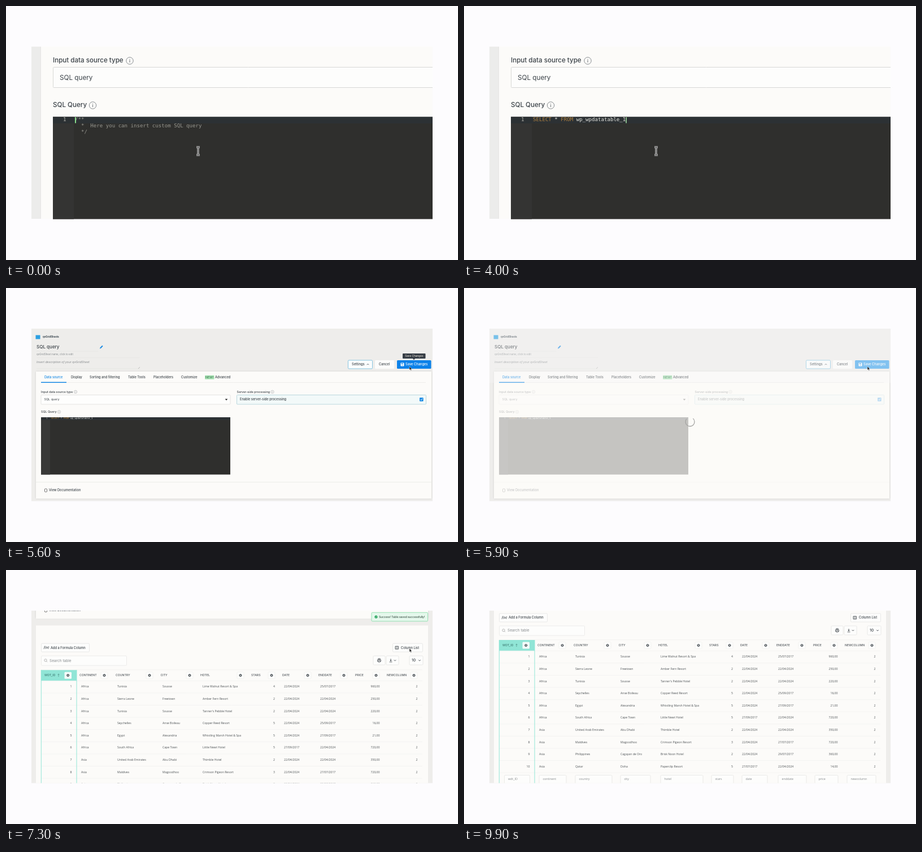
Write an HTML page with a canvas that moves like this. It is 800 by 450 pixels and loops after 10 s.

```html
<!DOCTYPE html>
<html lang="en">
<head>
<meta charset="utf-8">
<style>
html, body { margin: 0; width: 100%; height: 100%; overflow: hidden; background: #fdfcfe; }
canvas { display: block; width: 800px; height: 450px; }
</style>
</head>
<body>
<canvas id="stage" width="800" height="450"></canvas>
<script>
const stage = document.getElementById('stage');
const layer = document.createElement('canvas');
layer.width = 800;
layer.height = 450;
const main = stage.getContext('2d'), side = layer.getContext('2d');
let c = main;

const UI = 'Inter, sans-serif', CELL = '"Open Sans", sans-serif', MONO = '"DejaVu Sans Mono", monospace';
const INK = '#3b4248', MUTED = '#85898c', GREY = '#eeedeb', PAPER = '#fcfbf9', EDGE = '#dededc',
  BLUE = '#1488e4', DARK = '#2f2f2d', TEAL = '#90e5d6';
const QUERY = 'SELECT * FROM wp_wpdatatable_1';
const SCROLL = 340;

// ---------- drawing helpers ----------
function rect(x, y, w, h, fill, stroke, r = 0) {
  c.beginPath();
  c.roundRect(x, y, w, h, r);
  if (fill) { c.fillStyle = fill; c.fill(); }
  if (stroke) { c.strokeStyle = stroke; c.lineWidth = 0.8; c.stroke(); }
}
function text(s, x, y, size, color = INK, weight = 400, font = UI, align = 'left') {
  c.font = `${weight} ${size}px ${font}`;
  c.textAlign = align;
  c.textBaseline = 'middle';
  c.fillStyle = color;
  c.fillText(s, x, y);
}
function line(points, color, width = 0.8) {
  c.beginPath();
  points.forEach(([x, y]) => c.lineTo(x, y));
  c.strokeStyle = color;
  c.lineWidth = width;
  c.stroke();
}
function ring(x, y, r, color, width, from = 0, to = 7) {
  c.beginPath();
  c.arc(x, y, r, from, to);
  c.strokeStyle = color;
  c.lineWidth = width;
  c.stroke();
}
function shape(points, fill) {
  c.beginPath();
  points.forEach(([x, y]) => c.lineTo(x, y));
  c.fillStyle = fill;
  c.fill();
}
function info(x, y, r) {
  ring(x, y, r, '#777d82', r / 7);
  rect(x - r * .09, y - r * .15, r * .18, r * .65, '#777d82');
  rect(x - r * .09, y - r * .5, r * .18, r * .2, '#777d82');
}
function chevron(x, y, dir = 1) {
  line([[x - 1.8, y - dir], [x, y + dir], [x + 1.8, y - dir]], INK, 0.8);
}
function gear(x, y) {
  c.setLineDash([0.9, 0.85]);
  ring(x, y, 2.2, INK, 1);
  c.setLineDash([]);
  ring(x, y, 1.5, INK, 1.1);
}
function ibeam(x, y, s) {
  const mark = (color, w) => {
    line([[x, y - 7 * s], [x, y + 7 * s]], color, w);
    for (const d of [-7, 7]) line([[x - 3 * s, y + d * s], [x + 3 * s, y + d * s]], color, w);
  };
  mark('#e8e8e8', 3 * s);
  mark('#222', s);
}
function arrow(x, y) {
  const p = [[0, 0], [0, 7], [1.6, 5.6], [2.8, 8], [4, 7.4], [2.8, 5.2], [5, 5], [0, 0]].map(([a, b]) => [x + a * .9, y + b * .9]);
  shape(p, '#222');
  line(p, '#fff', 0.4);
}

// ---------- timing helpers ----------
const ease = p => p * p * (3 - 2 * p);
function track(t, keys, curve = p => p) {
  if (t <= keys[0][0]) return keys[0][1];
  for (let i = 1; i < keys.length; i++) {
    const [a, from] = keys[i - 1], [b, to] = keys[i];
    if (t <= b) return from + (to - from) * curve((t - a) / (b - a));
  }
  return keys[keys.length - 1][1];
}

function code(s, x, y, size) {
  const step = size * 0.602;
  let col = 0;
  for (const word of s.split(/(\s+)/)) {
    text(word, x + col * step, y, size, /^(SELECT|FROM)$/.test(word) ? '#b0803f' : '#e6e6e0', 400, MONO);
    col += word.length;
  }
  return x + col * step;
}

// ---------- close view of the editor ----------
function closeView(t) {
  rect(0, 0, 800, 450, '#fdfcfe');
  rect(45, 72, 710, 305, PAPER);
  rect(45, 72, 16.5, 305, '#ececeb');
  rect(60.8, 72, 0.8, 305, '#e0e0df');
  text('Input data source type', 83, 97, 11.6, INK, 500);
  info(219, 97, 6.2);
  rect(83.5, 108.5, 690, 36, '#fdfdfc', '#cfcfcd', 1);
  rect(755, 100, 45, 50, '#fdfcfe');
  text('SQL query', 95, 127, 11.7);
  text('SQL Query', 83, 176, 11.6, INK, 500);
  info(153.5, 176, 6.2);

  rect(83, 196.5, 672, 181, DARK);
  rect(83, 196.5, 37, 181, '#343433');
  rect(83, 196.5, 672, 11.5, '#2c3134');
  text('1', 101, 202, 9.1, '#b5b5ae', 400, MONO);
  if (t < 500) {
    ['/**', '  *  Here you can insert custom SQL query', '  */'].forEach((s, i) => {
      if (t >= 300) rect(122, 196.5 + 11 * i, s.length * 5.47, 11, '#50575a');
      text(s, 122, 202 + 11 * i, 9.1, '#96968f', 400, MONO);
    });
    rect(122, 197, 2, 10.5, '#8be08b');
  } else {
    const n = Math.round(track(t, [[500, 0], [1000, 8], [1200, 8], [1600, 15], [1700, 15], [2700, 30]]));
    const end = code(QUERY.slice(0, n), 122, 202, 9.1);
    rect(end, 197, 1.5, 10.5, '#a5e6a5');
  }
  ibeam(track(t, [[4200, 340], [4400, 349]]), track(t, [[4200, 257], [4400, 254]]), 1);
}

// ---------- settings part of the page ----------
function settings(saved, hover) {
  const dx = saved ? -6 : 0, half = saved ? 332 : 335;
  rect(52.5, 83.5, 8, 7, '#2b9fe2');
  text('qvGridSheets', 65, 87, 4.3, '#34404a', 700);
  text('SQL query', 54, 104.5, 8.05, INK, 500);
  c.setLineDash([1, 1]);
  line([[54, 112], [163, 112]], '#d2d2d0', 0.5);
  c.setLineDash([]);
  line([[167.2, 106.3], [171, 102.4]], BLUE, 2);
  shape([[166, 107.6], [166.5, 105.5], [168, 107]], BLUE);
  if (saved) {
    rect(183, 102, 4, 5, null, '#aaa');
    text('[wpdatatable id=38]', 196, 104.5, 4.6, MUTED);
  }
  text('qvGridSheet name, click to edit', 54, 118, 4.4, MUTED);
  line([[54, 123.5], [237, 123.5]], '#e2e2e0', 0.5);
  text('Insert description of your qvGridSheet', 54, 131, 5.2, MUTED, 'italic 400');
  line([[54, 143], [237, 143]], '#dddddb', 0.5);
  line([[234, 143], [237, 140]], '#888', 0.5);

  rect(605.5 + dx, 128, 43, 15, '#fbfdfd', '#6bb9dc', 1.5);
  text('Settings', 612 + dx, 135.5, 5.75, INK, 500);
  chevron(640.5 + dx, 135.3, -0.6);
  rect(653 + dx, 128, 34, 15, '#fcfcfb', null, 1.5);
  text('Cancel', 660 + dx, 135.5, 5.75, INK, 500);
  rect(692 + dx, 128, 60.5, 15, hover ? '#0d82e9' : '#3ba2ed', null, 1.5);
  rect(698.5 + dx, 132.5, 6, 6, '#fff', null, 1);
  rect(699.7 + dx, 133.2, 3, 1.5, BLUE);
  ring(701.5 + dx, 136.7, 0.5, BLUE, 0.8);
  text('Save Changes', 707 + dx, 135.5, 5.75, '#fff', 500);
  if (hover && !saved) {
    rect(702, 116, 40.5, 9, '#363d45', null, 1);
    shape([[720, 125], [724, 125], [722, 127.5]], '#363d45');
    text('Save Changes', 722.3, 120.6, 4.75, '#f4ece0', 400, UI, 'center');
  }

  c.shadowColor = 'rgba(0,0,0,.12)';
  c.shadowBlur = 3;
  rect(53, 148, 700 + dx, 225, PAPER);
  c.shadowBlur = 0;
  const shift = saved ? 33 : 0;
  const tab = (s, x, color = INK) => text(s, x, 158.5, 5.65, color, 500);
  tab('Data source', 68, BLUE);
  tab('Display', 115);
  tab('Sorting and filtering', 148);
  if (saved) tab('Editing', 217, '#c2c4c4');
  tab('Table Tools', 216 + shift);
  tab('Placeholders', 261 + shift);
  tab('Customize', 310 + shift);
  rect(352 + shift, 154.8, 16.5, 7, '#a8e3b4', null, 1);
  text('NEW!', 353 + shift, 158.5, 5.4, '#4d8460', 500);
  tab('Advanced', 370 + shift);
  line([[62, 167.5], [743 + dx, 167.5]], '#e6e5e3', 0.6);
  rect(62, 166.6, 45, 1.4, BLUE);

  const right = saved ? 405.5 : 408.5;
  text('Input data source type', 62, 184, 5.25, INK, 500);
  info(123, 184, 2.7);
  rect(62, 189.5, half, 16.5, '#fefefd', EDGE, 1);
  text('SQL query', 67.5, 197.7, 5.4);
  const ax = 55 + half;
  shape([[ax - 2.3, 196.5], [ax + 2.3, 196.5], [ax, 199.2]], '#222');
  text('Server-side processing', right, 184, 5.25, INK, 500);
  info(right + 63, 184, 2.7);
  rect(right, 189.5, half, 16.5, '#f2f9f9', '#abcfd6', 1);
  text('Enable server-side processing', right + 5.5, 197.7, 5.65, INK, 500);
  const bx = right + half - 11.5;
  rect(bx, 194.2, 6.6, 6.6, BLUE, null, 1);
  line([[bx + 1.5, 197.5], [bx + 2.8, 199], [bx + 5.2, 195.8]], '#fff', 0.9);

  text('SQL Query', 62, 219.5, 5.3, INK, 500);
  info(94, 219.5, 2.7);
  rect(62, 229, half, 101.5, DARK);
  rect(62, 229, 16, 101.5, '#393938');
  rect(62, 229, half, 5, '#2c3134');
  text('1', 71, 231.4, 4.1, '#aaa', 400, MONO);
  code(QUERY, 79.5, 231.4, 4.1);
  line([[53, 344], [753 + dx, 344]], '#e6e5e3', 0.7);
  rect(68.5, 355.8, 4, 5.4, null, '#555', 0.7);
  text('View Documentation', 76, 358.5, 5.7, INK, 500);
}

// ---------- table part of the page ----------
const left = [130, 194, 273.5, 344, 434, 489, 553, 618, 674];
const gears = [174, 254, 325, 415, 470, 534, 598, 655, 722];
const names = ['continent', 'country', 'city', 'hotel', 'stars', 'date', 'enddate', 'price', 'newcolumn'];
const cells = [133, 197, 277, 348, 476, 492, 556, 661.5, 728.5];
const rightCols = [4, 7, 8];
const boxEnds = [181, 262, 330, 423, 477, 537, 606, 662, 729];
const A = '22/04/2024';
const rows = [
  ['Tunisia', 'Sousse', 'Lime Walnut Resort & Spa', 4, A, '25/07/2017', 960],
  ['Sierra Leone', 'Freetown', 'Amber Fern Resort', 2, A, A, 250],
  ['Tunisia', 'Sousse', "Tanner's Pebble Hotel", 2, A, A, 220],
  ['Seychelles', 'Anse Boileau', 'Copper Reed Resort', 5, A, '25/09/2017', 16],
  ['Egypt', 'Alexandria', 'Whistling Marsh Hotel & Spa', 5, A, '27/09/2017', 21],
  ['South Africa', 'Cape Town', 'Little Newt Hotel', 5, '27/09/2017', A, 720],
  ['United Arab Emirates', 'Abu Dhabi', 'Thimble Hotel', 2, A, A, 350],
  ['Maldives', 'Magoodhoo', 'Crimson Pigeon Resort', 3, A, '27/07/2017', 720],
  ['Philippines', 'Cagayan de Oro', 'Brisk Noon Hotel', 2, A, '29/07/2017', 360],
  ['Qatar', 'Doha', 'Paperclip Resort', 5, '27/07/2017', A, 14]
];

function table(active) {
  rect(53, 45, 694, 400, PAPER);
  rect(62.5, 77, 85, 15, '#fdfdfc', '#e4e4e2', 1.5);
  text('f(x)', 67, 84.5, 5.4, INK, 'italic 600');
  text('Add a Formula Column', 79, 84.7, 5.7, INK, 500);
  rect(684.5, 77, 53, 15, '#fdfdfc', '#e4e4e2', 1.5);
  rect(689, 82, 5.5, 5, null, INK);
  for (const x of [690.8, 692.7]) line([[x, 82], [x, 87]], INK, 0.5);
  text('Column List', 699, 84.7, 5.7, INK, 500);
  rect(62.5, 99, 151, 17, '#fdfdfc', '#e8e8e6', 1.5);
  ring(70, 106.8, 2.2, '#999', 0.7);
  line([[71.6, 108.4], [73, 110]], '#999', 0.7);
  text('Search table', 77, 107.5, 6.5, MUTED);
  for (const [x, w] of [[650, 21], [673, 22], [714, 24]]) rect(x, 99, w, 16, '#fdfdfc', '#e4e4e2', 1.5);
  rect(657.5, 105.5, 6, 3.5, null, INK, 0.8);
  rect(658.8, 103.8, 3.4, 1.7, null, INK);
  rect(658.8, 107.5, 3.4, 2.4, '#fff', INK);
  line([[681, 104], [681, 108]], INK);
  shape([[679.3, 106.5], [682.7, 106.5], [681, 108.5]], INK);
  line([[678.5, 109.8], [683.5, 109.8]], INK);
  chevron(688.5, 107);
  text('10', 718, 107.3, 6.8, INK, 500);
  chevron(732, 107);

  line([[62, 123.8], [737, 123.8]], '#ecebe9', 0.6);
  rect(62, 124, 63, 19.2, TEAL);
  text('WDT_ID', 68, 133.5, 5.15, '#3d7a72', 500);
  line([[93, 136], [93, 131]], '#3d7a72', 0.6);
  line([[91.7, 132.5], [93, 131], [94.3, 132.5]], '#3d7a72', 0.6);
  rect(103.5, 127.5, 12.5, 12, '#f3fbf9', null, 1.5);
  gear(109.7, 133.5);
  names.forEach((s, i) => {
    text(s.toUpperCase(), left[i], 133.5, 5.15, '#50565b', 500);
    rect(gears[i] - 6, 127.5, 12, 12, '#fdfdfc', '#f0f0ee', 1.5);
    gear(gears[i], 133.5);
  });

  rows.forEach((row, i) => {
    const top = 143.2 + 21.6 * i, y = top + 10.8;
    if (i === active) rect(62, top, 675, 21.6, '#d7f7f1');
    line([[62, top], [737, top]], '#efeeec', 0.6);
    text(i + 1, 116.5, y, 5.15, '#4c5155', 400, CELL, 'right');
    [i < 6 ? 'Africa' : 'Asia', ...row.slice(0, 6), row[6] + ',00', 2].forEach((v, k) =>
      text(v, cells[k], y, 5.15, '#4c5155', 400, CELL, rightCols.includes(k) ? 'right' : 'left'));
  });
  line([[62, 359.2], [737, 359.2]], '#efeeec', 0.6);
  const filter = (s, x, end) => {
    rect(x, 363.5, end - x, 15, '#fdfdfc', '#e6e6e4', 1.5);
    text(s, x + 6.5, 371, 5.3, MUTED, 400, CELL);
  };
  filter('wdt_ID', 71.5, 116.5);
  names.forEach((s, i) => filter(s, [133, 197, 277, 348, 438, 492, 556, 621, 678][i], boxEnds[i]));
  for (const x of [62.3, 125]) line([[x, 124], [x, 380]], TEAL, 1);
}

function toast(alpha) {
  c.globalAlpha = alpha;
  rect(647, 75.3, 99.5, 15.5, '#e5f8ec', '#82dba5', 1.5);
  ring(655, 83, 1.3, '#26a35c', 2.6);
  line([[653.8, 83], [654.7, 84], [656.3, 82]], '#fff', 0.6);
  text('Success! Table saved successfully!', 660, 83.2, 4.8, '#3a5145', 500);
  c.globalAlpha = 1;
}

// ---------- whole page ----------
function pageView(t) {
  const mx = track(t, [[4400, 215], [5300, 714], [7700, 714], [8300, 702], [8800, 702], [9300, 694]], ease);
  const my = track(t, [[4400, 251], [5300, 139], [7700, 139], [8300, 166], [8800, 166], [9300, 385]], ease);
  const scroll = track(t, [[6700, 0], [7500, SCROLL]], ease);
  const saved = t >= 6300, busy = t >= 5800 && t < 6600;
  const hover = mx > 692 && scroll === 0;

  rect(0, 0, 800, 450, '#fdfcfe');
  c.save();
  c.beginPath();
  c.rect(45, 72, 710, 305.5);
  c.clip();
  rect(45, 72, 710, 306, GREY);
  c.save();
  c.translate(0, -scroll);
  settings(saved, hover && (saved || !busy));
  if (scroll > 0) {
    c.translate(0, SCROLL);
    table(Math.floor((my + scroll - SCROLL - 143.2) / 21.6));
  }
  c.restore();
  if (busy) {
    rect(45, 72, 710, 96, 'rgba(245,245,243,.38)');
    rect(53, 168, saved ? 694 : 700, 205, 'rgba(252,251,249,.73)');
    const a = t / 160;
    ring(400, 237, 8, '#a5a5a3', 1.3, a, a + 4.7);
  }
  if (saved) toast(track(t, [[6300, .4], [6500, 1], [8900, 1], [9200, 0]]));
  if (mx < 397 && my > 229) ibeam(mx, my, .5);
  else arrow(mx, my);
  c.restore();
}

function draw(now) {
  const t = Math.floor(now % 10000 / 100) * 100;
  const fade = track(t, [[4200, 0], [4500, 1]]);
  c = main;
  if (fade > 0) pageView(t);
  if (fade < 1) {
    c = side;
    closeView(t);
    main.globalAlpha = 1 - fade;
    main.drawImage(layer, 0, 0);
    main.globalAlpha = 1;
  }
}

let start;
function tick(now) {
  start ??= now;
  draw(now - start);
  requestAnimationFrame(tick);
}
draw(0);
requestAnimationFrame(tick);
</script>
</body>
</html>
```
